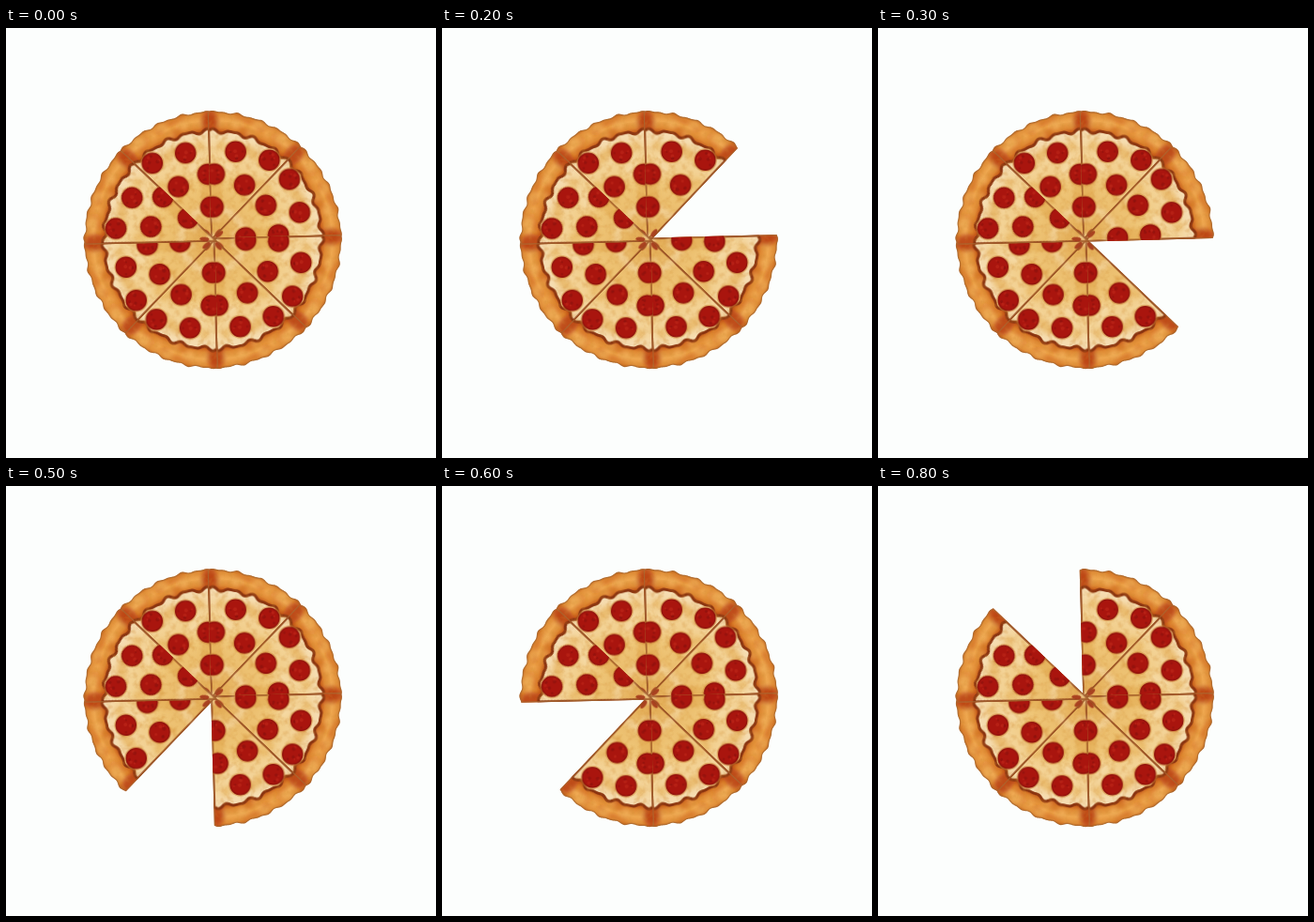
An HTML page for the animation above (900 ms loop, 458 by 458 pixels).

```html
<!DOCTYPE html>
<html lang="en">
<head>
<meta charset="utf-8">
<title>Pizza</title>
<style>
  html, body { margin: 0; width: 100%; height: 100%; overflow: hidden; background: #fcfefd; }
  svg { display: block; width: 100%; height: 100%; }
</style>
</head>
<body>
<svg viewBox="0 0 458 458">
  <defs>
    <radialGradient id="crustFill" gradientUnits="userSpaceOnUse" cx="0" cy="0" r="138">
      <stop offset=".83" stop-color="#bf5014"/>
      <stop offset=".87" stop-color="#e08a34"/>
      <stop offset=".92" stop-color="#efa850"/>
      <stop offset=".97" stop-color="#e1903a"/>
      <stop offset="1" stop-color="#c0621c"/>
    </radialGradient>
    <radialGradient id="cheeseFill" gradientUnits="userSpaceOnUse" cx="0" cy="0" r="118">
      <stop offset="0" stop-color="#e2aa52"/>
      <stop offset=".5" stop-color="#efc679"/>
      <stop offset=".85" stop-color="#f4d69e"/>
      <stop offset="1" stop-color="#f6dfb8"/>
    </radialGradient>
    <filter id="soft"><feGaussianBlur stdDeviation="2.6"/></filter>
    <filter id="fine"><feGaussianBlur stdDeviation=".7"/></filter>
    <filter id="grain" x="0" y="0" width="1" height="1">
      <feTurbulence type="fractalNoise" baseFrequency=".16" numOctaves="3" seed="4"/>
      <feColorMatrix values="0 0 0 0 .62  0 0 0 0 .25  0 0 0 0 .03  1.9 0 0 0 -.86"/>
    </filter>
    <clipPath id="sliceClip"><path id="sliceEdge"/></clipPath>
    <g id="slice" clip-path="url(#sliceClip)">
      <path id="crust" fill="url(#crustFill)"/>
      <g id="bake" filter="url(#soft)"></g>
      <path id="cheese" fill="url(#cheeseFill)" stroke="#8a3410" stroke-width="3" filter="url(#fine)"/>
      <g id="melt" filter="url(#soft)"></g>
      <rect x="-6" y="-140" width="112" height="146" filter="url(#grain)" opacity=".45"/>
      <path id="seam" fill="none" stroke="#a56a34" stroke-width="2.4" opacity=".7"/>
      <g id="toppings" filter="url(#fine)"></g>
    </g>
  </defs>
  <g id="pizza" transform="translate(220.3 225.6)"></g>
</svg>
<script>
const $ = id => document.getElementById(id);
const OVERLAP = 2, TILT = -1.5, MIRRORED = [1, 3, 5, 6, 7];

let seed = 11;
const rand = (lo = 0, hi = 1) => lo + (hi - lo) * (seed = seed * 16807 % 2147483647) / 2147483647;

function add(parent, tag, attrs) {
  const el = document.createElementNS('http://www.w3.org/2000/svg', tag);
  for (const k in attrs) el.setAttribute(k, attrs[k]);
  return parent.appendChild(el);
}

// Slice space: tip at the origin, one cut straight up, the other 45 degrees clockwise.
function polar(r, deg) {
  const a = deg * Math.PI / 180;
  return [r * Math.sin(a), -r * Math.cos(a)];
}

// The slice is slightly wider than its eighth, so neighbours overlap.
function wedge(radius) {
  const pts = [[-OVERLAP, OVERLAP / Math.tan(Math.PI / 8)]];
  for (let d = -.85; d < 46; d += .5) pts.push(polar(radius(d), d));
  return 'M' + pts.map(p => p.map(v => v.toFixed(2))).join('L') + 'Z';
}
const outer = wedge(d => 136.6 + .8 * Math.sin(d * .62) + .6 * Math.sin(d * 1.05 + 1));
const inner = wedge(d => 115.8 + 1.6 * Math.sin(d * .56 + 1) + .9 * Math.sin(d * .9));
for (const id of ['sliceEdge', 'crust', 'seam']) $(id).setAttribute('d', outer);
$('cheese').setAttribute('d', inner);

function blob(group, r, deg, rx, ry, fill, opacity) {
  const [cx, cy] = polar(r, deg);
  add($(group), 'ellipse', { cx, cy, rx, ry, fill, opacity, transform: `rotate(${deg} ${cx} ${cy})` });
}

for (let i = 0; i < 14; i++)
  blob('bake', rand(118, 134), rand(0, 45), rand(3, 7), rand(2, 4), i % 2 ? '#cf5f18' : '#f4b863', .6);
for (const deg of [0, 45]) blob('bake', 124, deg, 9, 14, '#b5380c', .8);
for (let i = 0; i < 18; i++)
  blob('melt', 106 * Math.sqrt(rand()), rand(0, 45), rand(4, 9), rand(3, 6), i % 2 ? '#e3ab50' : '#f9e3bb', .55);
blob('melt', 50, 3, 8, 24, '#e2a548', .5);

function pepperoni(dist, deg) {
  const [cx, cy] = polar(dist, deg);
  const g = $('toppings');
  add(g, 'circle', { cx, cy, r: 12.6, fill: '#cf8636', opacity: .55 });
  add(g, 'circle', { cx, cy, r: 10.6, fill: '#a9150e', stroke: '#92130c', 'stroke-width': 1.4 });
  for (let i = 0; i < 7; i++) {
    const [dx, dy] = polar(8 * Math.sqrt(rand()), rand(0, 360));
    add(g, 'circle', { cx: cx + dx, cy: cy + dy, r: rand(1, 2), fill: i % 2 ? '#c0281a' : '#8b100e', opacity: .6 });
  }
}
pepperoni(35, 2);
pepperoni(70, 2.8);
pepperoni(97, 16);
pepperoni(67.5, 31.5);
pepperoni(104, 36.8);
blob('toppings', 9, 39, 2.2, 5, '#a3361a', .9);

// Laid clockwise, starting with the one left of the top.
const slices = [];
for (let n = 7; n < 15; n++) {
  const i = n % 8;
  const turn = MIRRORED.includes(i) ? `rotate(${45 * (i + 1) + TILT}) scale(-1 1)` : `rotate(${45 * i + TILT})`;
  slices[i] = add($('pizza'), 'use', { href: '#slice', transform: turn });
}

// The first beat shows the whole pizza, then each slice is missing in turn.
function draw(t) {
  const missing = Math.floor(t % 900 / 100) - 1;
  slices.forEach((slice, i) => slice.setAttribute('visibility', i === missing ? 'hidden' : 'visible'));
}
function tick(now) {
  draw(now);
  requestAnimationFrame(tick);
}
draw(0);
requestAnimationFrame(tick);
</script>
</body>
</html>
```
